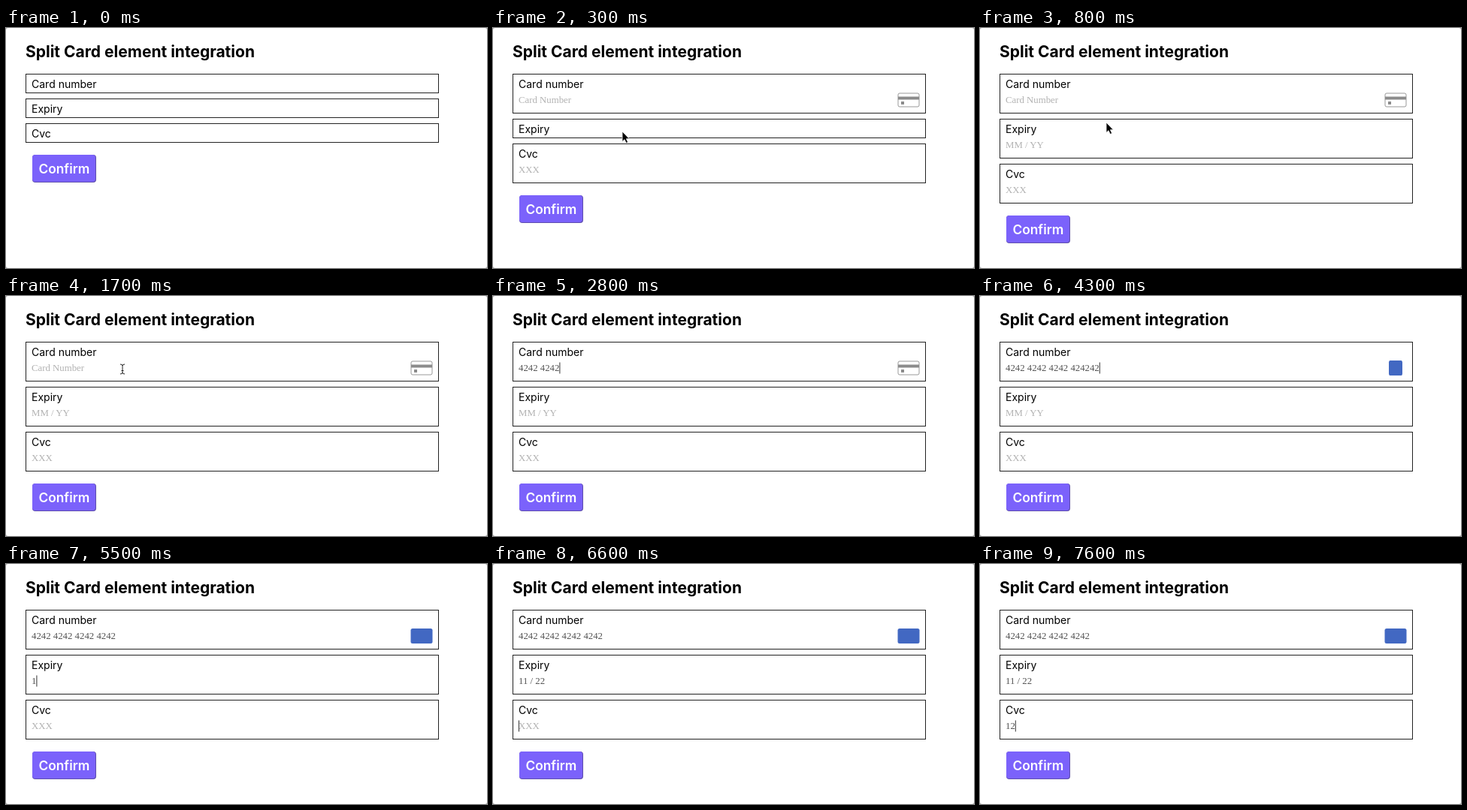
Recreate the animation shown at these times as an HTML page. Size 640 px wide and 320 px high, loop 7.7 s.

```html
<!DOCTYPE html>
<html lang="en">
<head>
<meta charset="utf-8">
<title>Split Card element integration</title>
<style>
  html, body { margin: 0; width: 100%; height: 100%; overflow: hidden; background: #b4b4b4; }
  svg { display: block; background: #fff; border-radius: 3px; }
  text { font: 14px Inter, sans-serif; white-space: pre; }
  .title { font-size: 21px; font-weight: 700; }
  .frame { fill: #fff; stroke: #222; }
  .value { font: 12.8px "Liberation Serif", serif; fill: #555; }
  .value.hint { fill: #b2b2b2; }
  .caret { stroke: #333; }
  .action { font-size: 17.3px; font-weight: 600; fill: #fff; }
</style>
</head>
<body>
<svg width="640" height="320" viewBox="0 0 640 320">
  <text class="title" x="26" y="38.5">Split Card element integration</text>
  <g id="fields"></g>
  <g id="button">
    <rect x="35" width="85" height="37" rx="4" fill="#5f4fae"/>
    <rect x="35" width="84" height="36" rx="4" fill="#7b62fb"/>
    <text class="action" x="43.5" y="25">Confirm</text>
  </g>
  <g id="icon">
    <g id="blank">
      <rect x="-14" y="-9" width="28" height="18" rx="2" fill="#fff" stroke="#999"/>
      <path d="M-14-4.5h28v4h-28zM-10 2h4v4h-4z" fill="#8b8b8b"/>
    </g>
    <rect id="brand" x="-14.5" y="-10" width="29" height="20" rx="2.5" fill="#4268c2"/>
  </g>
  <path id="arrow" d="M0 0V13.5L3 10.7 5.2 15.5 7.6 14.4 5.4 9.8H9.4Z" stroke="#fff" stroke-width=".8"/>
  <path id="beam" d="M-3-6.5Q0-6.5 0-4.5Q0-6.5 3-6.5M0-5V5M-3 6.5Q0 6.5 0 4.5Q0 6.5 3 6.5M-1.5 2h3" fill="none" stroke="#222"/>
</svg>
<script>
const LOOP = 7700, TOP = 61.5;
const $ = id => document.getElementById(id);

// keys: [time, text typed so far]; focus: [start, end]
const fields = [
  { label: 'Card number', hint: 'Card Number', opens: 200, focus: [2000, 5300], keys: [
    [2200, '4'], [2300, '42'], [2500, '424'], [2600, '4242 4'], [2700, '4242 424'],
    [2800, '4242 4242'], [3000, '4242 4242 4'], [3100, '4242 4242 42'],
    [3200, '4242 4242 424'], [3300, '4242 4242 4242'], [3500, '4242 4242 4242 4'],
    [3700, '4242 4242 4242 42'], [3800, '4242 4242 4242 424'],
    [4000, '4242 4242 4242 4242'], [4300, '4242 4242 4242 424242'],
    [4400, '4242 4242 4242 4242']] },
  { label: 'Expiry', hint: 'MM / YY', opens: 400, focus: [5300, 6500], keys: [
    [5500, '1'], [5700, '11 / '], [5900, '11 / 2'], [6100, '11 / 22']] },
  { label: 'Cvc', hint: 'XXX', opens: 200, focus: [6500, LOOP], keys: [
    [7300, '1'], [7500, '12']] }
];

for (const f of fields) {
  const g = document.createElementNS('http://www.w3.org/2000/svg', 'g');
  g.innerHTML = `<rect class="frame" x="26.5" width="549"/>
    <text x="34" y="18.2">${f.label}</text>
    <text class="value" x="34" y="38.5"></text>
    <path class="caret" d="M0 27V42"/>`;
  $('fields').append(g);
  f.group = g;
  [f.frame, f.value, f.caret] = ['.frame', '.value', '.caret'].map(s => g.querySelector(s));
}

const show = (el, on) => el.setAttribute('visibility', on ? 'visible' : 'hidden');
const place = (el, x, y, scale = 1) =>
  el.setAttribute('transform', `translate(${x} ${y}) scale(${scale} 1)`);

// Piecewise linear path through [time, x, y] points
function along(points, t) {
  if (t <= points[0][0]) return points[0].slice(1);
  for (let i = 1; i < points.length; i++) {
    const [t0, x0, y0] = points[i - 1], [t1, x1, y1] = points[i];
    if (t <= t1) {
      const p = (t - t0) / (t1 - t0);
      return [x0 + (x1 - x0) * p, y0 + (y1 - y0) * p];
    }
  }
  return points.at(-1).slice(1);
}

function drawField(f, t, y) {
  const open = t >= f.opens;
  const text = f.keys.findLast(k => t >= k[0])?.[1] ?? '';
  place(f.group, 0, y);
  f.frame.setAttribute('height', open ? 52 : 25);
  f.value.textContent = open ? text || f.hint : '';
  f.value.classList.toggle('hint', !text);
  const blinkOff = t >= 4900 && t < 5100;
  show(f.caret, t >= f.focus[0] && t < f.focus[1] && !blinkOff);
  place(f.caret, 34.5 + (text ? f.value.getComputedTextLength() : 0), 0);
  return y + (open ? 60 : 33);
}

function drawIcon(t) {
  const known = t >= 4300;
  const turn = known ? Math.min(1, 0.62 + (t - 4300) / 500) : 1;
  place($('icon'), 553, 96, turn);
  show($('blank'), t >= 200 && !known);
  show($('brand'), known);
}

function drawPointer(t) {
  const [x, y] = along([[100, 177, 160], [300, 172, 138], [800, 168, 126], [1600, 155, 97.5]], t);
  const inside = y < 108;
  const visible = t >= 100 && t < 2200;
  show($('arrow'), visible && !inside);
  show($('beam'), visible && inside);
  place($('arrow'), x, y);
  place($('beam'), x, y);
}

function draw(now) {
  const t = Math.floor(now % LOOP / 100) * 100;
  let y = TOP;
  for (const f of fields) y = drawField(f, t, y);
  place($('button'), 0, y + 8.5);
  drawIcon(t);
  drawPointer(t);
}

const start = performance.now();
function tick() {
  draw(performance.now() - start);
  requestAnimationFrame(tick);
}
tick();
</script>
</body>
</html>
```
